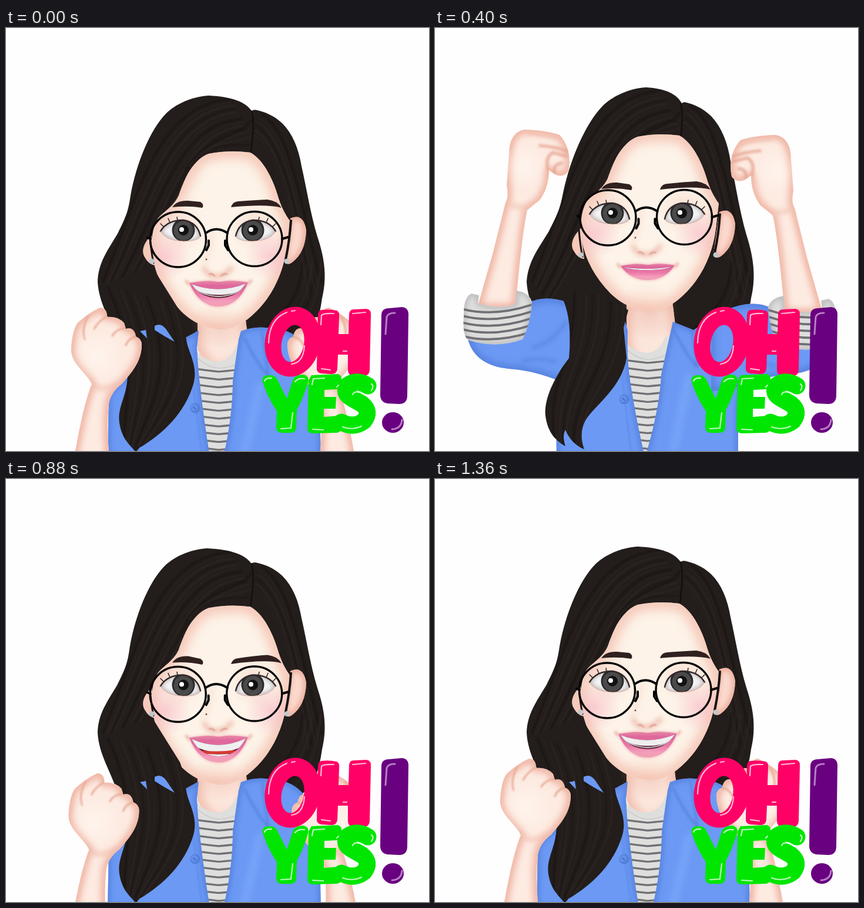
Write an HTML page with a canvas that moves like this. It is 720 px wide and 720 px high and loops after 1.44 s.

```html
<!DOCTYPE html>
<html lang="en">
<head>
<meta charset="utf-8">
<title>Oh yes!</title>
<style>
html, body { margin: 0; width: 100%; height: 100%; overflow: hidden; background: #fefefe; }
canvas { display: block; width: 100vw; height: 100vh; }
</style>
</head>
<body>
<canvas id="stage" width="720" height="720" role="img" aria-label="OH YES!"></canvas>
<script>
const c = document.getElementById('stage').getContext('2d');
const STEP = 80, STEPS = 18;
const HAIR = '#231d1b', SKIN = '#fdebe2', SKIN_EDGE = '#eeae9c', BLUE = '#6b99f4', BLUE_EDGE = '#5580dc';

// step, hair top, hairline, glasses, eyes, chin, brow, brow tilt, mouth y, opening, lip depth, half width
const HEAD = [
  [0, 0, 0, 0, 0, 0, 0, 0, 434, 16, 40, 50],
  [3, 5, 2, 2, 6, 3, 6, 4, 446, 3, 24, 43],
  [5, -14, -29, -37, -29, -31, -31, 1, 405, 3, 24, 46],
  [7, -17, -33, -44, -35, -38, -37, 2, 398, 11, 28, 50],
  [9, 3, 8, 10, 9, 12, 11, 5, 444, 24, 43, 50],
  [13, 3, 3, 3, 4, 3, 4, 0, 437, 16, 41, 50],
  [17, 0, 0, 0, 0, 0, 0, 0, 434, 16, 40, 50]
];
// step, dx, dy, mirror axis
const LOW_ARMS = [[0, 0, 0, 355], [1, -6, 40, 356], [2, -20, 150, 358], [9, -8, 46, 358], [13, -1, 4, 355], [17, 0, 0, 355]];
const UP_ARMS = [[4, -11, 110, 366], [5, 0, 0, 366], [7, -7, 6, 365], [8, 14, 130, 364]];

const BODY = {
  low: {
    neck: 568, side: 392,
    left: 'M173,730 L175,625 Q188,605 207,595 L232,510 L300,530 L328,515 L325,545 Q328,610 347,730Z',
    right: 'M400,516 Q422,508 442,510 Q500,510 520,560 L534,640 L536,730 L370,730 Q386,660 386,600 L396,530Z',
    lock: 'M158,440 C176,500 204,540 207,590 C207,625 189,645 193,672 C197,700 212,710 221,722 L230,711 Q226,714 228,714 C268,690 304,656 319,606 C326,580 316,562 309,540 C304,520 306,508 296,482 L248,405Z'
  },
  wide: {
    neck: 575, side: 418,
    left: 'M76,730 Q135,675 148,645 Q165,598 200,555 L235,520 L323,545 L322,600 Q330,655 345,730Z',
    right: 'M418,525 Q424,516 432,523 Q455,535 505,535 Q560,560 600,640 L630,690 Q648,704 662,730 L367,730 Q384,655 400,598 L427,552Z',
    lock: 'M157,440 C176,505 205,545 205,595 C203,635 187,662 189,695 Q196,714 210,724 L236,721 C280,700 306,645 321,613 C330,590 328,570 323,518 L300,480 L248,405Z'
  },
  up: {
    neck: 553, side: 392,
    left: 'M207,730 L205,590 L226,478 L322,494 L328,515 Q326,560 332,600 Q341,660 357,730Z',
    right: 'M405,500 Q425,508 440,514 Q480,488 530,470 L525,600 L516,640 L516,730 L358,730 Q383,645 385,590 L396,540Z',
    lock: 'M218,462 Q234,500 228,562 C205,592 185,630 188,660 C192,690 206,702 222,712 Q216,694 222,684 Q232,708 254,717 Q244,690 256,668 C272,642 318,612 326,562 L321,510 L329,480 L290,460 L246,400Z'
  }
};
const bodyAt = s => s < 2 || s > 8 ? 'low' : s < 5 ? 'wide' : 'up';

function at(table, s) {
  const i = Math.max(1, table.findIndex(r => r[0] >= s));
  const a = table[i - 1], b = table[i];
  const u = (s - a[0]) / (b[0] - a[0]), k = u * u * (3 - 2 * u);
  return a.slice(1).map((v, j) => v + (b[j + 1] - v) * k);
}
const clamp = v => Math.min(1, Math.max(0, v));
// Shifts every point of a path by f(x, y) = [dx, dy]
const warp = (d, f) => d.replace(/(-?[\d.]+),(-?[\d.]+)/g, (_, x, y) => {
  const [dx, dy] = f(+x, +y);
  return `${+x + dx},${+y + dy}`;
});

function fill(d, color) { c.fillStyle = color; c.fill(new Path2D(d)); }
function line(d, color, w, blur = 0) {
  c.save();
  if (blur) c.filter = `blur(${blur}px)`;
  c.strokeStyle = color; c.lineWidth = w; c.lineCap = c.lineJoin = 'round';
  c.stroke(new Path2D(d));
  c.restore();
}
function clipped(d, draw) { c.save(); c.clip(new Path2D(d)); draw(); c.restore(); }
function soft(d, base, edge, w = 14, blur = 6) {
  fill(d, base);
  clipped(d, () => line(d, edge, w, blur));
}
function moved(x, y, draw) { c.save(); c.translate(x, y); draw(); c.restore(); }
function glow(x, y, r, rgb, alpha) {
  const g = c.createRadialGradient(x, y, 0, x, y, r);
  g.addColorStop(0, `rgba(${rgb},${alpha})`);
  g.addColorStop(1, `rgba(${rgb},0)`);
  c.fillStyle = g;
  c.fillRect(x - r, y - r, 2 * r, 2 * r);
}
function dot(x, y, r, color) { c.fillStyle = color; c.beginPath(); c.arc(x, y, r, 0, 7); c.fill(); }
function ring(x, y, rx, ry, w) {
  c.strokeStyle = '#050505'; c.lineWidth = w;
  c.beginPath(); c.ellipse(x, y, rx, ry, 0, 0, 7); c.stroke();
}
// Hair strands spread between two cubic curves
function strands(a, b, n) {
  for (let i = 0; i < n; i++) {
    const p = a.map((v, j) => v + (b[j] - v) * (i + .5) / n);
    line(`M${p[0]},${p[1]} C${p.slice(2)}`, i % 3 ? '#2b2422' : '#1b1614', i % 2 ? 1.5 : 3, 1);
  }
}

function hair(h) {
  const lift = (x, y) => {
    const k = h * clamp((430 - y) / 315);
    return [-k * clamp((430 - x) / 80), k];
  };
  const d = warp('M345,115 C315,117 288,130 272,146 C245,174 222,230 212,285 C208,312 205,320 190,350 C172,380 157,400 156,432 C158,470 180,500 190,535 L505,535 Q530,520 538,460 C548,420 540,385 530,355 C518,315 512,275 503,235 C498,205 488,180 470,162 C455,148 440,143 428,140 Q422,138 418,141 C408,126 385,117 345,115Z', lift);
  fill(d, HAIR);
  clipped(d, () => {
    strands([380, 118 + h, 250, 130 + h, 220, 290, 164, 430], [414, 180 + h, 310, 190 + h, 290, 330, 195, 470], 11);
    strands([436, 142 + h, 490, 175 + h, 500, 300, 540, 430], [420, 185 + h, 460, 210 + h, 495, 330, 505, 470], 6);
    strands([418, 150 + h, 390, 190 + h, 345, 180 + h, 305, 240 + h], [417, 205 + h, 385, 202 + h, 350, 195 + h, 318, 232 + h], 4);
    strands([500, 400, 500, 450, 470, 490, 420, 520], [540, 400, 535, 460, 520, 500, 490, 535], 5);
    line(`M418,${141 + h} C424,${165 + h} 419,${185 + h} 417,${212 + h}`, '#14100f', 2.5, .6);
  });
}

function torso(b) {
  const n = b.neck;
  soft('M326,465 L326,548 Q345,582 364,584 Q400,575 414,546 L404,465Z', '#fce6dc', '#f0bcab', 18, 8);
  glow(364, n - 70, 50, '228,165,145', .4);
  const shirt = `M318,${n - 28} Q332,${n - 2} 361,${n} Q${b.side - 8},${n - 3} ${b.side},${n - 28} L440,${n - 25} L385,730 L330,730Z`;
  fill(shirt, '#dededd');
  clipped(shirt, () => {
    for (let y = n + 14; y < 730; y += 13.3) line(`M315,${y - 3} Q342,${y + 1} 362,${y + 3} Q385,${y + 1} 420,${y - 3}`, '#707074', 3.2);
    line(`M318,${n - 14} Q340,${n + 11} 365,${n + 11} Q395,${n + 9} 415,${n - 14}`, '#c8c8c8', 1.2);
  });
  soft(b.left, BLUE, BLUE_EDGE, 8, 4);
  soft(b.right, BLUE, BLUE_EDGE, 8, 4);
  clipped(b.right, () => {
    line(`M406,${n - 40} Q425,${n} 447,${n + 25} Q440,${n - 20} 436,${n - 50}`, BLUE_EDGE, 3, 2);
    line(`M432,${n + 40} Q420,${n + 100} 405,725`, '#79a5fa', 12, 6);
  });
  line(`M316,${n + 20} Q324,${n + 90} 334,725`, '#5f8ce8', 2, 1);
  dot(322, n + 79, 8.5, '#527fd8');
  dot(320.5, n + 78, 6, '#6390ec');
  line(`M319,${n + 77} l4,4`, '#4770c4', 2);
}

function lowArm() {
  const d = 'M96,880 L118,720 Q132,640 146,606 C138,588 112,572 111,550 C111,530 116,506 124,500 Q142,484 160,476 Q172,476 172,492 Q190,490 201,502 L204,512 Q218,508 221,525 Q232,530 231,541 C230,570 212,588 198,605 Q178,620 175,640 Q171,680 175,720 L180,880Z';
  soft(d, SKIN, SKIN_EDGE, 13, 6);
  clipped(d, () => {
    line('M172,491 Q158,498 150,512 M202,511 Q188,512 181,524 M222,525 Q208,528 204,540 M140,490 Q128,512 134,530', '#e9a996', 3, 1.5);
    glow(155, 560, 45, '255,246,239', .8);
    line('M148,608 Q165,620 190,606', '#f2c0b0', 6, 4);
  });
}

function upArm() {
  soft('M262,482 Q195,448 160,468 L56,530 Q68,574 125,580 Q170,583 214,602 L262,610Z', BLUE, BLUE_EDGE, 12, 6);
  line('M166,545 Q200,535 224,500 M150,566 Q180,560 205,568', '#5984e0', 4, 3);
  const arm = 'M72,476 L98,385 L120,297 Q126,288 122,268 L126,215 Q126,178 152,173 Q190,174 212,182 Q220,190 226,206 Q231,225 227,244 Q218,256 204,249 L194,242 Q194,272 178,293 Q164,304 157,310 Q148,350 137,476Z';
  const cuff = 'M62,452 Q48,458 49,490 Q46,528 59,532 Q105,546 149,530 Q162,505 165,466 Q160,450 138,447 L137,470 Q105,480 73,468 L75,455Z';
  soft(arm, SKIN, SKIN_EDGE, 13, 6);
  clipped(arm, () => {
    line('M178,200 Q205,202 226,210 M193,242 Q186,222 200,212 L224,218 M203,248 Q200,232 216,230', '#e5a18d', 4, 2);
    line('M160,180 Q190,182 214,190', '#f0bfb0', 3, 2);
    line('M126,300 Q145,306 160,306', '#f2c0b0', 5, 4);
    glow(150, 235, 38, '255,246,239', .8);
  });
  soft(cuff, '#dededd', '#b9b9bb', 8, 4);
  clipped(cuff, () => {
    for (let y = 478; y < 535; y += 11.5) line(`M45,${y} Q100,${y + 15} 168,${y - 8}`, '#707074', 3.8);
  });
}

function bothArms(draw, [dx, dy, axis], drop) {
  moved(dx, dy, draw);
  c.save();
  c.translate(2 * axis, drop); c.scale(-1, 1);
  moved(dx, dy, draw);
  c.restore();
}

function eye(x, y, side) {
  const d = 'M-35,1 Q-24,-18 4,-18 Q28,-14 33,10 Q28,18 4,18 Q-26,17 -35,1Z';
  c.save();
  c.translate(x, y); c.scale(side, 1);
  soft(d, '#f4f4f4', '#bdb6b8', 6, 3);
  clipped(d, () => {
    dot(4, -1, 19.5, '#2a2a2b');
    dot(4, 0, 16.5, '#4b4a4b');
    dot(4, -1, 9, '#111');
    dot(4 - 3 * side, -2, 4, '#fff');
  });
  line('M-35,1 Q-24,-18 4,-18 Q28,-14 33,9', '#33272a', 2.5);
  line('M-30,-7 l-5,-5 M-19,-14 l-3,-7 M-6,-18 l-1,-5', '#33272a', 1.6);
  line('M-35,1 Q-26,17 4,18 Q28,18 33,10', '#d9a79d', 1);
  c.restore();
}

function mouth(y, open, deep, w) {
  const l = 362 - w, r = 362 + w, sag = 3 + open * .42;
  const lips = `M${l},${y} Q340,${y - 5} 353,${y - 3} Q362,${y - 1} 371,${y - 3} Q386,${y - 5} ${r},${y - 1} Q${r - 17},${y + deep} 362,${y + deep} Q${l + 17},${y + deep} ${l},${y}Z`;
  const gap = `M${l + 4},${y + 2} Q362,${y + 2 * sag} ${r - 4},${y + 1} Q${r - 20},${y + sag + open} 362,${y + sag + open} Q${l + 20},${y + sag + open} ${l + 4},${y + 2}Z`;
  line(`M${l - 5},${y - 3} l4,5 M${r + 5},${y - 4} l-4,5`, '#eaa99d', 4, 2);
  const g = c.createLinearGradient(0, y - 5, 0, y + deep);
  g.addColorStop(0, '#ea8fac'); g.addColorStop(.22, '#de669a'); g.addColorStop(.55, '#e878a6'); g.addColorStop(.8, '#f49dbc'); g.addColorStop(1, '#f0a0b2');
  c.save(); c.shadowColor = '#f0a3a8'; c.shadowBlur = 5;
  fill(lips, g);
  c.restore();
  fill(gap, '#5a2030');
  clipped(gap, () => {
    line(`M${l},${y + 1} Q362,${y + 2 * sag + open * .5} ${r},${y + 1}`, '#efeff0', Math.max(4, open * .75));
    if (open > 19) {
      line(`M335,${y + sag + open * .64} Q362,${y + sag + open * .78} 388,${y + sag + open * .6}`, '#d8392f', 5);
      line(`M325,${y + sag + open * .82} Q362,${y + sag + open * 1.08} 398,${y + sag + open * .8}`, '#efeff0', 4);
    } else if (open > 8) line(`M${l},${y + 4} Q362,${y + 2 * sag + open * 1.4} ${r},${y + 4}`, '#c9c9cc', 2);
  });
}

function head([h, top, gl, ey, chin, brow, tilt, my, open, deep, w]) {
  const slide = (x, y) => [0, y < 300 ? top : y > 440 ? chin : top + (chin - top) * (y - 300) / 140];
  const side = chin * .35;
  moved(0, side, () => {
    soft('M484,324 Q506,314 511,344 Q510,382 487,399 Q478,406 474,395Z', '#fbd9cd', '#e8a593', 8, 4);
    fill('M248,352 C236,364 229,378 236,390 Q243,403 254,404Z', '#f6c9ba');
  });
  const face = warp('M345,214 Q380,207 416,212 C440,225 456,262 464,290 C470,308 476,318 483,328 L478,372 C474,405 462,436 445,460 C425,488 398,510 372,513 C345,514 318,502 298,482 C272,455 256,425 250,392 C247,370 247,345 258,325 C268,312 284,306 294,285 C306,250 322,222 345,214Z', slide);
  soft(face, '#fdf3e8', '#f3bbaa', 18, 10);
  clipped(face, () => {
    glow(272, 388 + gl, 42, '248,180,196', .6);
    glow(450, 388 + gl, 42, '248,180,196', .6);
    glow(297, 340 + ey, 42, '240,185,168', .4);
    glow(423, 340 + ey, 42, '240,185,168', .4);
    glow(360, 512 + chin, 50, '245,190,172', .45);
  });
  line(`M326,${228 + top} C312,${240 + top} 304,${258 + top} 298,${278 + top}`, '#f0cfc2', 1.5);
  moved(0, gl, () => {
    line('M337,408 Q342,422 356,422 Q372,424 384,408', '#eaa796', 5, 4);
    line('M346,419 q5,-2 9,3 M366,422 q5,-5 10,-3', '#d98d80', 2, 1);
    line('M352,350 Q344,385 338,400', '#fbe0d4', 6, 4);
    dot(341, 394, 1.4, '#6d473f');
  });
  eye(298, 345 + ey, 1);
  eye(424, 345 + ey, -1);
  moved(0, brow, () => {
    fill(`M283,305 Q291,293 310,294 L331,${296 + tilt} Q338,${301 + tilt} 334,${306 + tilt} Q310,${302 + tilt / 2} 283,305Z`, '#30201f');
    fill(`M383,${305 + tilt} Q386,${295 + tilt} 396,${295 + tilt} Q424,293 445,292 Q462,294 469,306 Q444,299 383,${305 + tilt}Z`, '#30201f');
  });
  mouth(my, open, deep, w);
  moved(0, side, () => {
    line('M485,328 Q483,360 476,394', '#161110', 4);
    line('M245,355 Q247,380 251,400', '#161110', 3);
    dot(248, 397, 4.5, '#bfc9cc');
    dot(478, 397, 4.5, '#bfc9cc');
  });
  moved(-gl * .04, gl, () => {
    ring(293, 360, 47.5, 47, 3.4);
    ring(423, 359, 47, 46.5, 3.4);
    line('M340,349 Q358,336 377,349', '#050505', 4);
    line('M345,362 v8 l-4,8 M373,362 v8 l5,8', '#050505', 4);
    line('M470,359 L480,356 M246,359 L241,357', '#050505', 4);
  });
}

function frontLock(name) {
  const d = BODY[name].lock;
  fill(d, HAIR);
  clipped(d, () => {
    if (name === 'up') strands([232, 450, 235, 560, 185, 600, 200, 700], [325, 460, 330, 600, 250, 620, 250, 715], 9);
    else strands([168, 440, 225, 560, 195, 620, 200, 715], [290, 470, 330, 590, 290, 640, 235, 710], 11);
  });
  if (name === 'low') fill('M253,507 Q266,500 276,518 L287,534 Q268,524 253,514Z M228,516 L238,514 L240,528Z', BLUE);
}

function sticker() {
  const pink = '#ff0066', green = '#00e600', purple = '#690080', shine = 'rgba(255,255,255,.75)';
  c.fillStyle = pink;
  c.beginPath();
  c.ellipse(488, 534, 47, 60, .2, 0, 7);
  c.moveTo(507, 536);
  c.ellipse(488, 537, 19, 32, .2, 0, 7);
  c.fill('evenodd');
  fill('M536,480 Q550,478 563,481 Q568,483 567,492 L566,521 L583,521 L584,488 Q584,479 592,479 L614,478 Q622,479 621,490 L619,583 Q618,592 609,592 L590,591 Q582,591 582,582 L582,556 L565,556 L564,580 Q563,589 554,589 L537,588 Q528,587 529,578 L531,488 Q532,481 536,480Z', pink);
  line('M447,536 Q448,495 478,484 M486,482 L492,481 M508,541 Q506,570 486,572', shine, 2.2);
  line('M536,505 L537,489 Q540,485 558,486 M590,486 L612,484 M574,550 L580,550 M537,580 L552,582', shine, 2.2);

  fill('M437,603 Q434,591 448,591 Q458,590 462,599 L478,631 L488,600 Q492,590 505,590 Q517,591 514,604 Q506,630 495,650 L494,681 Q493,689 484,689 L468,689 Q460,688 460,679 L461,652 Q446,630 437,603Z', green);
  fill('M520,591 L565,589 Q572,591 571,600 L570,612 Q568,615 560,615 L542,616 L542,628 L562,628 L561,648 L541,648 L541,662 L566,660 Q572,664 570,675 L570,684 Q569,689 560,689 L522,690 Q512,689 513,680 L515,600Z', green);
  line('M616,609 Q597,597 582,608 Q572,622 590,631 L606,640 Q622,653 609,669 Q592,682 571,671', green, 29);
  line('M440,601 Q442,595 452,596 M468,682 L485,681 L488,655 M492,602 Q498,595 508,597', shine, 2.2);
  line('M521,607 L523,597 L542,596 M522,683 L540,684 M566,608 L563,611 M590,624 Q592,618 601,620 M573,679 Q588,685 605,678 M622,606 Q627,609 622,617', shine, 2.2);

  fill('M639,489 Q639,477 652,477 L674,475 Q686,476 685,490 L683,627 Q682,640 669,640 L649,639 Q637,637 637,624Z', purple);
  c.beginPath(); c.ellipse(658.5, 671.5, 18.5, 17.5, 0, 0, 7); c.fill();
  line('M646,521 L648,492 Q650,485 662,485 M657,683 Q673,682 674,667', '#b77fc4', 3);
}

function draw(s) {
  const name = bodyAt(s), pose = at(HEAD, s);
  c.fillStyle = '#fefefe';
  c.fillRect(0, 0, 720, 720);
  hair(pose[0]);
  torso(BODY[name]);
  if (s > 3 && s < 9) bothArms(upArm, at(UP_ARMS, s), 9);
  head(pose);
  frontLock(name);
  if (s < 3 || s > 8) bothArms(lowArm, at(LOW_ARMS, s), 0);
  sticker();
}

let start, shown = -1;
function tick(now) {
  start ??= now;
  const s = Math.floor((now - start) / STEP) % STEPS;
  if (s !== shown) draw(shown = s);
  requestAnimationFrame(tick);
}
draw(0);
requestAnimationFrame(tick);
</script>
</body>
</html>
```
